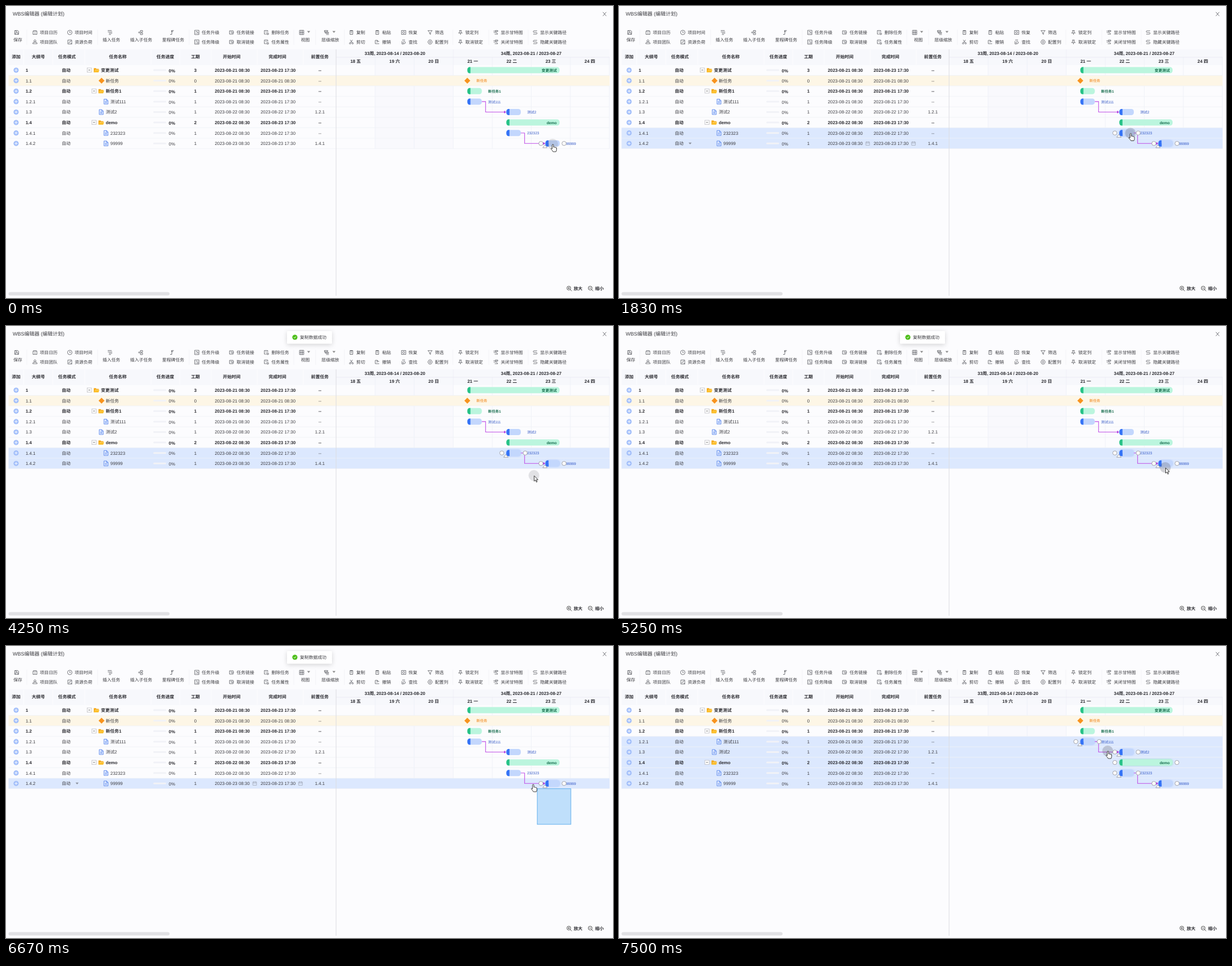
Recreate the animation shown at these times as an HTML page. Size 1080 by 519 pixels, loop 8 s.

```html
<!DOCTYPE html>
<html lang="zh">
<head>
<meta charset="utf-8">
<style>
html, body { margin: 0; width: 100%; height: 100%; overflow: hidden; background: #fcfcfe; }
svg { display: block; width: 100vw; height: 100vh; }
text { font: 7.875px "Liberation Sans", "Noto Sans CJK SC", "Noto Sans CJK", sans-serif; fill: #3c3c40; white-space: pre; text-rendering: geometricPrecision; }
.bold { font-weight: 700; fill: #2b2b30; }
.title { font-size: 9px; }
.label { font-size: 6.4px; fill: #2f55c4; }
.strong { font-weight: 700; }
.inner { font-size: 6.75px; font-weight: 700; fill: #146b4c; }
.icon { fill: none; stroke: #55565c; stroke-width: .8; }
.shadow { filter: drop-shadow(0 2px 4px rgba(0, 0, 0, .16)); }
.glow { filter: blur(1.4px); }
</style>
</head>
<body>
<svg viewBox="0 0 1080 519" preserveAspectRatio="none">
  <g id="back"></g><g id="selection"></g><g id="content"></g><g id="overlay"></g>
</svg>
<script>
const LOOP = 8000, STEP = 1000 / 12;
const ROW_TOP = 104.8, ROW_H = 18.6, COL_W = 69.45, GANTT_X = 587.3;
const $ = id => document.getElementById(id);
const rowTop = i => ROW_TOP + i * ROW_H;
const rowMid = i => rowTop(i) + ROW_H / 2;

const text = (x, y, s, cls = '', anchor = 'start', fill = '') =>
  `<text x="${x}" y="${y + 2.9}" class="${cls}" text-anchor="${anchor}"${fill && ` style="fill:${fill}"`}>${s}</text>`;
const mid = (x, y, s, cls) => text(x, y, s, cls, 'middle');
const rect = (x, y, w, h, fill, extra = '') =>
  `<rect x="${x}" y="${y}" width="${w}" height="${h}" fill="${fill}" ${extra}/>`;
const circle = (x, y, r, fill, extra = '') => `<circle cx="${x}" cy="${y}" r="${r}" fill="${fill}" ${extra}/>`;
const path = (d, x, y, attrs) => `<path d="${d}" transform="translate(${x} ${y})" ${attrs}/>`;
const line = (x1, y1, x2, y2, color, w = .8) =>
  `<path d="M${x1} ${y1}L${x2} ${y2}" stroke="${color}" stroke-width="${w}"/>`;

const GLYPHS = {
  save: 'M-3.5-3.5h5.5l1.5 1.5v5.5h-7zM-2 3.5v-3h4v3M-1.5-3.5v2h3',
  calendar: 'M-3.5-2.5h7v6h-7zM-1.5-4v2.5M1.5-4v2.5M-1.5 1h3',
  team: 'M-4 3q0-3 4-3t4 3zM-1.8-2a1.8 1.8 0 1 0 3.6 0a1.8 1.8 0 1 0-3.6 0',
  clock: 'M-4 0a4 4 0 1 0 8 0a4 4 0 1 0-8 0M0-2.3v2.5h1.8',
  chart: 'M-3.5-3.5h7v7h-7zM-2 2l1.5-2.5 1 1 1.8-3M4 4l-2-2',
  list: 'M-4-3.5h7M-4-1h8M-2 1.3h6M-2 3.7h4',
  insert: 'M-4 0h3M-2.3-1.5l1.5 1.5-1.5 1.5M0-3.5h4v2.8h-4zM0 1h4v2.8h-4z',
  flag: 'M-3 3.5h3v-7h3.5M-.5-3.5v2h3',
  up: 'M-3.8-3.8h7.6v7.6h-7.6zM-2-1.5h3M-2 1.5h1.5M1.8 2.5v-3.3M.6 .5l1.2-1.4',
  down: 'M-3.8-3.8h7.6v7.6h-7.6zM-2-1.5h3M-2 1.5h1.5M1.8-.8v3.3M.6 1.2l1.2 1.4',
  link: 'M-3.8-3h6.5v6h-6.5zM-2-1h3M-1 1h3l2-2',
  remove: 'M-3.8-3.5h6v3M-3.8-3.5v6.5h3M-2-1h2.5M.5 1.2h3v2.5h-3z',
  grid: 'M-3.8-3.8h7.6v7.6h-7.6zM-3.8 0h7.6M-1.2-3.8v7.6M1.5-3.8v7.6',
  level: 'M-4-3.5h6v2h-6zM-1.5 0h5v1.5h-5zM-1 3.7h5M-3-1.5v2.3h1.5',
  copy: 'M-2.5-3.5h5v7h-5zM-1-3.5v1.5h2v-1.5M-1 .5h2',
  cut: 'M-2-3.8l3.5 5M2-3.8l-3.5 5M-3.5 2.3a1.3 1.3 0 1 0 2.6 0a1.3 1.3 0 1 0-2.6 0M.9 2.3a1.3 1.3 0 1 0 2.6 0a1.3 1.3 0 1 0-2.6 0',
  undo: 'M-3.5-3h4v2M-3.5-3v6h7M-1 1l2-2h2.5M1-3l-2 2',
  restore: 'M-3.8-3.5h7.6v7h-7.6zM-1.8 0a1.8 1.8 0 1 0 3.6 0a1.8 1.8 0 1 0-3.6 0',
  find: 'M-2.5-3.5h5M-3-1.5v5h3M-1 1a2 2 0 1 0 4 0a2 2 0 1 0-4 0',
  filter: 'M-3.8-3.3h7.6l-2.8 3.2v3.4l-2-1v-2.4z',
  gear: 'M-2-3.5h4l2 3.5-2 3.5h-4l-2-3.5zM-1.3 0a1.3 1.3 0 1 0 2.6 0a1.3 1.3 0 1 0-2.6 0',
  pin: 'M-2-3.5h4M-1.3-3.5v3l-2 1.5h6.6l-2-1.5v-3M0 1v3',
  gantt: 'M-1-3.5h4.5v2h-4.5zM-4 0h5M-2 3h5.5M1 0l2.5 3M-4-2.5h2',
  route: 'M3.5-3h-5q-2 0-2 1.5t2 1.5h3q2 0 2 1.5t-2 1.5h-5',
};
const icon = (name, x, y) => path(GLYPHS[name], x, y, 'class="icon"');
const magnifier = (x, plus) => path(`M-4-.6a3.4 3.4 0 1 0 6.8 0a3.4 3.4 0 1 0-6.8 0M2 2l2.6 2.6M-2.2-.6h3.2${plus ? 'M-.6-2.2v3.2' : ''}`,
  x, 502, 'class="icon" style="stroke:#222"');

// icon x, upper icon and label, lower icon and label
const TOOLS = [
  [51.5, 'calendar', '项目日历', 'team', '项目团队'],
  [113.5, 'clock', '项目时间', 'chart', '资源负荷'],
  [339.5, 'up', '任务升级', 'down', '任务降级'],
  [401.5, 'link', '任务链接', 'link', '取消链接'],
  [463.5, 'remove', '删除任务', 'remove', '任务属性'],
  [614.5, 'copy', '复制', 'cut', '剪切'],
  [660.5, 'copy', '粘贴', 'undo', '撤销'],
  [707.5, 'restore', '恢复', 'find', '查找'],
  [754.5, 'filter', '筛选', 'gear', '配置列'],
  [808.5, 'pin', '锁定列', 'pin', '取消锁定'],
  [871.5, 'gantt', '显示甘特图', 'gantt', '关闭甘特图'],
  [941.5, 'route', '显示关键路径', 'route', '隐藏关键路径'],
];
const BIG_TOOLS = [
  ['save', 19, 21, '保存'], ['list', 185, 187.5, '插入任务'], ['insert', 239, 240.5, '插入子任务'],
  ['flag', 295, 297.5, '里程碑任务'], ['grid', 526, 532.5, '视图'], ['level', 570.5, 577, '层级缩放'],
];
const HEADERS = [[18, '添加'], [57.5, '大纲号'], [108.5, '任务模式'], [199, '任务名称'], [283.5, '任务进度'],
  [337, '工期'], [401.5, '开始时间'], [483, '完成时间'], [558.5, '前置任务']];
const DAYS = ['18 五', '19 六', '20 日', '21 一', '22 二', '23 三', '24 四'];

// start and end are days of the month, bar is its left and right edge
const TASKS = [
  { no: '1', kind: 'group', indent: 0, name: '变更测试', days: 3, start: 21, end: 23, bar: [820.8, 985] },
  { no: '1.1', kind: 'milestone', indent: 1, name: '新任务', days: 0, start: 21, end: 21 },
  { no: '1.2', kind: 'group', indent: 1, name: '新任务1', days: 1, start: 21, end: 21, bar: [820.8, 846.6] },
  { no: '1.2.1', kind: 'task', indent: 2, name: '测试111', days: 1, start: 21, end: 21, bar: [820.8, 846.6] },
  { no: '1.3', kind: 'task', indent: 1, name: '测试2', days: 1, start: 22, end: 22, pred: '1.2.1', bar: [890.2, 916] },
  { no: '1.4', kind: 'group', indent: 1, name: 'demo', days: 2, start: 22, end: 23, bar: [890.2, 985] },
  { no: '1.4.1', kind: 'task', indent: 2, name: '232323', days: 1, start: 22, end: 22, bar: [890.2, 916] },
  { no: '1.4.2', kind: 'task', indent: 2, name: '99999', days: 1, start: 23, end: 23, pred: '1.4.1', bar: [959.7, 985.2] },
];
const MENU = ['复制', '剪切', '粘贴', '任务属性', '插入其他任务', '删除任务', '任务升级', '任务降级', '更新资源', '关于'];

function drawBack() {
  let s = rect(0, 0, 1080, 519, '#fcfcfe') + rect(4.5, 77, 1069.5, 27.8, '#f7f8fc');
  s += rect(GANTT_X + COL_W, ROW_TOP, 2 * COL_W, 8 * ROW_H, '#f9f9fd');
  for (let i = 1; i < 8; i++) {
    const x = GANTT_X + i * COL_W;
    s += line(x, i == 3 ? 77 : 91, x, rowTop(8), '#edeff7');
  }
  for (const x of [31.5, 83, 140, 258, 309, 365, 447, 529]) s += line(x, 78, x, 104, '#fdfdff', 1);
  return s + line(GANTT_X, 91, 1074, 91, '#e6e8f0') + rect(4.5, rowTop(1), 1069.5, ROW_H, '#fdf6e6');
}

function drawToolbar() {
  let s = text(12, 14, 'WBS编辑器 (编辑计划)', 'title') + path('M-3-3.5l6 7M3-3.5l-6 7', 1065, 14.3, 'class="icon"');
  for (const [x, upIcon, up, lowIcon, low] of TOOLS) {
    s += icon(upIcon, x, 47) + text(x + 8.7, 47, up) + icon(lowIcon, x, 64) + text(x + 8.7, 64, low);
  }
  for (const [name, x, labelX, label] of BIG_TOOLS) s += icon(name, x, 47) + mid(labelX, 60.5, label);
  for (const x of [538.5, 583.5]) s += path('M-2.7-1.5h5.4l-2.7 3.2z', x, 46, 'fill="#888"');
  for (const x of [37, 163, 326, 512, 551, 602, 795, 859, 929]) s += line(x, 42, x, 69, '#f0f0f5');
  return s;
}

function drawRow(task, i) {
  const y = rowMid(i), group = task.kind == 'group', cls = group ? 'bold' : '';
  const iconX = 161 + task.indent * 8.4;
  let s = line(4.5, rowTop(i + 1), 1074, rowTop(i + 1), '#eff1f7');
  s += circle(18, y, 4.6, '#a3bffa') + path('M-2.6 0h5.2M0-2.6v5.2', 18, y, 'stroke="#fff" stroke-width=".9"');
  s += text(35, y, task.no, cls) + mid(107, y, '自动', cls);
  if (group) {
    s += rect(iconX - 16.5, y - 4, 7.6, 7.6, '#fff', 'stroke="#b4b4ba" stroke-width=".7"') + line(iconX - 14.5, y - .2, iconX - 11, y - .2, '#555');
    s += path('M-4.8 4v-7.6h3.6l1.2 1.3h4v1.5h-6.5l-1.5 4.6z', iconX, y, 'fill="#f5a50c"') + path('M-2.6-.7h7.8l-1.6 4.7h-8z', iconX, y, 'fill="#fcc02e"');
  } else if (task.kind == 'milestone') {
    for (const x of [iconX + .6, 820.8]) s += path('M0-5.3l5.3 5.3-5.3 5.3-5.3-5.3z', x, y, 'fill="#f8931d"');
  } else {
    s += path('M-3.5-4.4h4.6l2.6 2.6v6.2h-7.2zM1-4.4v2.7h2.7M-1.6 0h3.4M-1.6 2h3.4', iconX, y, 'fill="#dfe9ff" stroke="#4a7bea" stroke-width=".8"');
  }
  s += text(iconX + 8, y, task.name, cls);
  s += rect(262, y - 1.5, 23, 3, '#f1f2f7', 'rx="1.5"') + mid(295.3, y + .8, '0%', cls) + mid(337, y, task.days, cls);
  const endTime = task.days ? '17:30' : '08:30';
  s += text(371.5, y, `2023-08-${task.start} 08:30`, cls) + text(453, y, `2023-08-${task.end} ${endTime}`, cls);
  return s + mid(558.5, y, task.pred || '--', cls);
}

function drawBar(task, i) {
  const y = rowMid(i);
  if (!task.bar) return text(837, y - .3, task.name, 'label strong', 'start', '#f3a14a');
  const [x, end] = task.bar, group = task.kind == 'group', inside = group && end - x > 50;
  return rect(x, y - 5.5, end - x, 11, group ? '#bbf5de' : '#c3d7fd', 'rx="4.5"')
    + path('M5.6-5.5v11h-1.2q-4.4 0-4.4-5.5t4.4-5.5z', x, y, `fill="${group ? '#27c287' : '#3573f6'}"`)
    + (inside ? text(980, y - .4, task.name, 'inner', 'end')
      : text(end + 11.2, y - .3, task.name, group ? 'label strong' : 'label', 'start', group ? '#146b4c' : ''));
}

const link = (x, y1, y2, endX) =>
  `<path d="M${x} ${y1}h6.7V${y2}H${endX - 3}" fill="none" stroke="#c04fe6" stroke-width="1.1"/>` +
  path('M0 0l-3.8-2.6v5.2z', endX, y2, 'fill="#b03ade"');

function drawContent() {
  let s = drawToolbar();
  for (const [x, label] of HEADERS) s += mid(x, 90.3, label, 'bold');
  s += mid(692, 83.8, '33周, 2023-08-14 / 2023-08-20', 'bold') + mid(934.5, 83.8, '34周, 2023-08-21 / 2023-08-27', 'bold');
  DAYS.forEach((day, i) => s += mid(GANTT_X + (i + .5) * COL_W, 98, day, 'bold'));
  s += TASKS.map(drawRow).join('') + TASKS.map(drawBar).join('');
  s += link(846.6, rowMid(3), rowMid(4), 890) + link(916, rowMid(6), rowMid(7), 959.5);
  s += line(GANTT_X, 77, GANTT_X, 515, '#dcdde2', 1);
  s += rect(4.5, 508.5, 286.5, 6, '#e1e1e4', 'rx="3"');
  return s + magnifier(1002, true) + text(1010, 502, '放大', 'bold') + magnifier(1040, false) + text(1048, 502, '缩小', 'bold');
}

// pointer stops: time, x, y
const STOPS = [[0, 973, 246], [250, 973, 246], [550, 962, 484], [920, 945, 239], [1083, 930, 230], [1500, 914, 228],
  [1750, 910.5, 226.5], [2750, 910.5, 226.5], [3333, 931.5, 245.5], [3580, 930, 241], [3900, 930, 241], [4580, 949, 290],
  [4920, 972.5, 252], [5420, 972.5, 252], [5830, 985, 267], [6200, 1005, 317], [6667, 938, 246], [7420, 870, 187], [8000, 870, 187]];
const within = (t, ...spans) => spans.some(([a, b]) => t >= a && t < b);

function pointerAt(t) {
  const i = Math.max(1, STOPS.findIndex(stop => stop[0] >= t));
  const [t0, x0, y0] = STOPS[i - 1], [t1, x1, y1] = STOPS[i];
  const k = Math.max(0, (t - t0) / (t1 - t0));
  return [x0 + (x1 - x0) * k, y0 + (y1 - y0) * k];
}

function selectedRows(t) {
  if (t < 240) return [];
  if (t < 1825) return [7];
  if (t < 5325) return [6, 7];
  return t < 7410 ? [7] : [3, 4, 5, 6, 7];
}

function drawSelected(i) {
  const { bar: [x, end], kind } = TASKS[i];
  return rect(4.5, rowTop(i), 1069.5, ROW_H, '#dce8fe') +
    rect(x, rowMid(i) - 5.5, end - x, 11, kind == 'group' ? '#8fdcbd' : '#a9c5fb', 'rx="4.5" class="glow"');
}

function drawHandles(i) {
  const { bar: [x, end], kind } = TASKS[i], y = rowMid(i), stroke = 'stroke="#8f8f96" stroke-width=".8"';
  return (kind == 'task' ? path('M-4.2 7.6l3.8-5 4.2 5z', x - .5, y, `fill="#fff" ${stroke}`) +
      path('M0 0q0 4 2.2 5.2h3.4V0z', x, y, 'fill="#3573f6"') : '')
    + circle(x - 8, y, 3.7, '#fff', stroke) + circle(end + 7.7, y, 3.7, '#fff', stroke);
}

function drawEditors() {
  const y = rowMid(7);
  return path('M-2.7-1.5h5.4l-2.7 3.2z', 126.5, y, 'fill="#8a8f9b"') +
    [442.5, 524].map(x => path('M-3.3-2.6h6.6v5.8h-6.6zM-3.3-.6h6.6M-1.6-3.7v2M1.6-3.7v2', x, y, 'fill="none" stroke="#9aa0ae" stroke-width=".7"')).join('');
}

function drawMenu(t) {
  let s = rect(911, 226, 76, 215, '#fff', 'rx="1" class="shadow"');
  if (t >= 3660) s += rect(911, 230, 75.5, 15, '#edf2fc');
  MENU.forEach((item, i) => s += text(920, 237.2 + i * 21.4, item));
  s += path('M-1.2-2.5l2.5 2.5-2.5 2.5', 974, 323, 'fill="none" stroke="#222" stroke-width="1.1"');
  return `<g opacity="${t < 2660 ? .5 : 1}">${s}</g>`;
}

function drawToast(t) {
  const shown = Math.min(1, (t - 3950) / 250, (7200 - t) / 250);
  if (shown <= 0) return '';
  return `<g opacity="${shown}" transform="translate(0 ${(shown - 1) * 14})">` +
    rect(500, 9, 80, 22.5, '#fff', 'rx="1.5" class="shadow"') + circle(514, 20, 4.6, '#4fbf1c') +
    path('M-2 0l1.5 1.6 2.6-3', 514, 20, 'fill="none" stroke="#fff" stroke-width="1"') + text(523, 20, '复制数据成功') + '</g>';
}

function drawMarquee(t) {
  const [x, y] = pointerAt(t - 50);
  return rect(x, y, 1005 - x, 317 - y, '#9fd0fa', 'fill-opacity=".65" stroke="#55a9ea" stroke-width=".9"');
}

const ARROW = 'M0 0v9.6l2.2-2 1.7 3.7 1.5-.7-1.7-3.5h3.1z';
const HAND = 'M-1.2 8V1.2Q-1.2 0 0 0t1.2 1.2V5q1.1-.9 2 .3 1.2-.6 1.8.5 1.6-.3 1.6 1.2v2.2q0 1.6-1.1 3.8H.4Q-1 10.6-3.2 8.4q-.5-1.4.7-1.4z';
function drawPointer(t) {
  const [x, y] = pointerAt(t);
  const hand = within(t, [0, 300], [1490, 2570], [6580, 6740], [7400, LOOP]);
  const pressed = within(t, [160, 240], [1825, 2160], [3740, 3900], [5160, 5400], [7400, LOOP]);
  const halo = within(t, [6200, 7400]) ? '' : circle(x - .5, y - .5, 9.6, '#50505a', `opacity="${pressed ? .25 : .15}"`);
  return halo + path(hand ? HAND : ARROW, x, y, 'fill="#fff" stroke="#222" stroke-width=".9" stroke-linejoin="round"');
}

function render(t) {
  const rows = selectedRows(t);
  $('selection').innerHTML = rows.map(drawSelected).join('');
  const handles = new Set([7, ...rows]);
  if (within(t, [990, 5325])) handles.add(6);
  let s = [...handles].map(drawHandles).join('');
  if (within(t, [240, 1910], [5910, 7410])) s += drawEditors();
  if (within(t, [2575, 3990])) s += drawMenu(t);
  s += drawToast(t);
  if (within(t, [6240, 7410])) s += drawMarquee(t);
  $('overlay').innerHTML = s + drawPointer(t);
}

$('back').innerHTML = drawBack();
$('content').innerHTML = drawContent();
const began = performance.now();
let lastStep = -1;
function tick() {
  const step = Math.floor(((performance.now() - began) % LOOP + 5) / STEP);
  if (step != lastStep) render((lastStep = step) * STEP % LOOP);
  requestAnimationFrame(tick);
}
tick();
</script>
</body>
</html>
```
